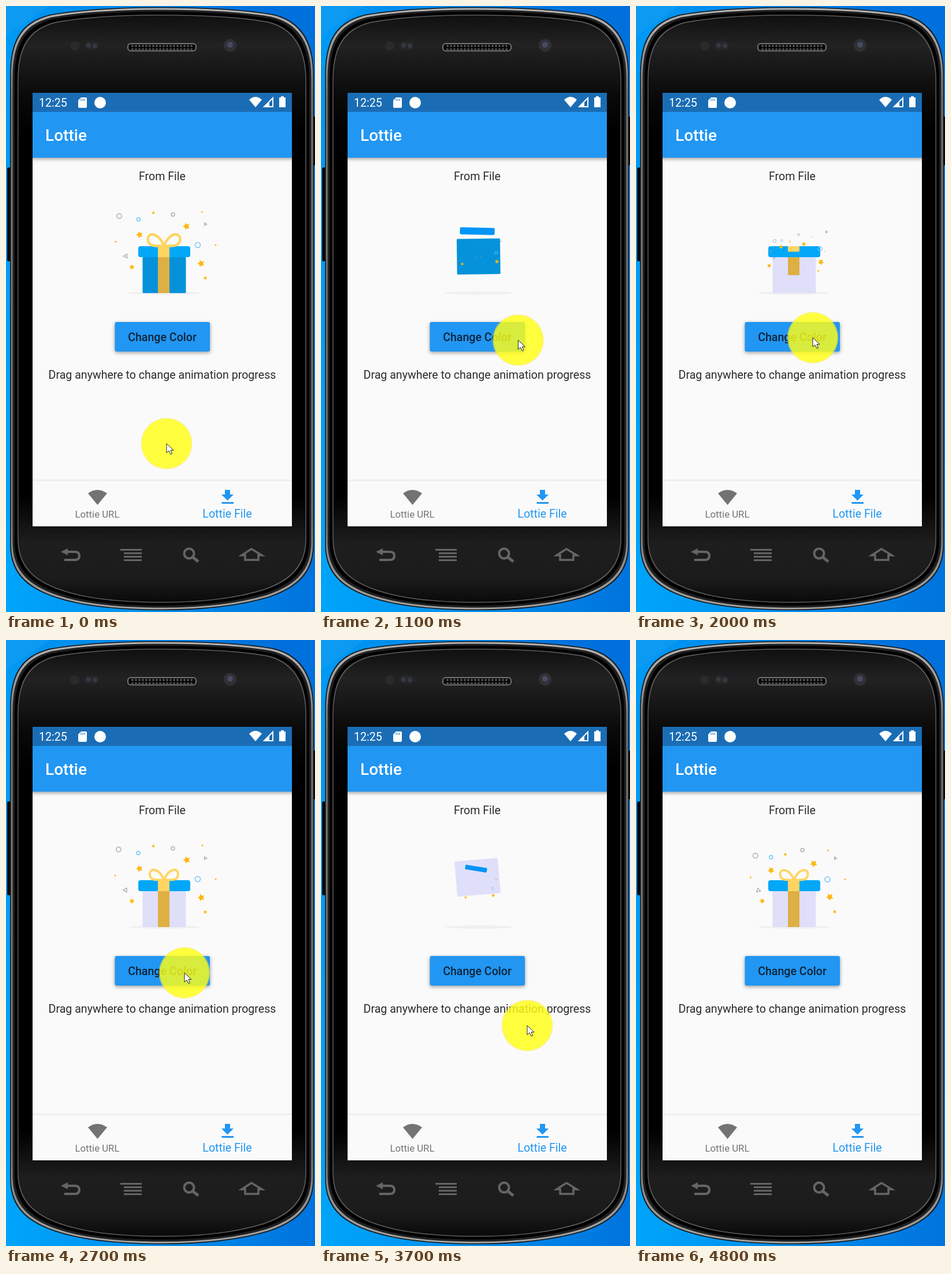
Write an HTML page that moves like this. It is 535 px wide and 1047 px high and loops after 4.9 s.

```html
<!DOCTYPE html>
<html lang="en">
<head>
<meta charset="utf-8">
<title>Lottie</title>
<style>
html, body { margin: 0; width: 100%; height: 100%; overflow: hidden; background: #0078dc; }
svg { display: block; width: 535px; height: 1047px; }
text { font: 19.6px Roboto, sans-serif; fill: #2b2b2b; }
.mid { text-anchor: middle; }
.bold { font-weight: 500; }
.bar { filter: drop-shadow(0 2px 3px #0006); }
.keys { fill: none; stroke: #656565; stroke-width: 4; }
</style>
</head>
<body>
<svg viewBox="0 0 535 1047">
  <defs>
    <linearGradient id="wall" x1="0" y1="1" x2="1" y2="0.75">
      <stop offset="0" stop-color="#00a5fb"/><stop offset="1" stop-color="#0071dc"/>
    </linearGradient>
    <linearGradient id="rim" x1="0" y1="0" x2="0" y2="1">
      <stop offset="0" stop-color="#b5b5b5"/><stop offset=".15" stop-color="#777"/>
      <stop offset=".85" stop-color="#777"/><stop offset="1" stop-color="#a5a5a5"/>
    </linearGradient>
    <linearGradient id="face" x1="0" y1="0" x2="0" y2="1">
      <stop offset="0" stop-color="#101010"/><stop offset=".05" stop-color="#222"/>
      <stop offset=".14" stop-color="#090909"/><stop offset=".2" stop-color="#000"/>
      <stop offset=".82" stop-color="#000"/><stop offset=".9" stop-color="#1e1e1e"/>
      <stop offset=".96" stop-color="#1b1b1b"/><stop offset="1" stop-color="#0a0a0a"/>
    </linearGradient>
    <pattern id="mesh" width="6" height="6" patternUnits="userSpaceOnUse">
      <circle cx="3" cy="3" r="1.9" fill="#555"/>
    </pattern>
    <radialGradient id="spot">
      <stop offset=".94" stop-color="#ffff14" stop-opacity=".82"/>
      <stop offset="1" stop-color="#ffe040" stop-opacity=".4"/>
    </radialGradient>
    <path id="shell" d="M7 120C7 60 25 28 75 15Q150 2 270 2Q390 2 462 14C510 25 533 60 533 120V930C533 980 505 1005 455 1022Q380 1044 270 1044Q150 1044 85 1022C35 1005 7 980 7 930Z"/>
    <clipPath id="screen"><path d="M46 150H495V899H46Z"/></clipPath>
  </defs>

  <rect width="535" height="1047" fill="url(#wall)"/>
  <path d="M0 0H75L0 52Z" fill="#18a0f4" opacity=".5"/>
  <rect x="2" y="279" width="8" height="162" rx="2" fill="#080808"/>
  <rect x="530" y="191" width="8" height="84" rx="2" fill="#080808"/>
  <g id="rims"></g>

  <circle cx="119" cy="69" r="8" fill="#2b2a2b"/>
  <rect x="136" y="61" width="25" height="15" rx="7" fill="#252629"/>
  <circle cx="143" cy="68" r="4" fill="#343840"/><circle cx="154" cy="69" r="4" fill="#343840"/>
  <circle cx="388" cy="68" r="11" fill="#303036"/><circle cx="388" cy="67" r="5" fill="#464b61"/>
  <rect x="211" y="65" width="118" height="12.5" rx="5" fill="#070707" stroke="#757575" stroke-width="2"/>
  <rect x="216" y="67" width="108" height="9" fill="url(#mesh)"/>

  <g class="keys">
    <path d="M104 943H119Q127 943 127 950T119 957H101"/>
    <path d="M95 943L107 937V949Z" fill="#656565" stroke="none"/>
    <path d="M198 939.500H235M204 945.500H235M204 951.500H235M204 957.500H235" stroke-width="3"/>
    <circle cx="317" cy="946" r="8.500"/><path d="M323 952L333 960" stroke-width="5"/>
    <path d="M408 949L425 938L443 949H437V957H414V949Z" stroke-width="3.500"/>
  </g>

  <g clip-path="url(#screen)">
    <rect x="46" y="150" width="449" height="749" fill="#fafafa"/>
    <rect class="bar" x="40" y="183" width="461" height="79" fill="#2196f3"/>
    <rect x="46" y="150" width="449" height="33" fill="#1a6db5"/>
    <rect x="46" y="818" width="449" height="3" fill="#efefef"/>
    <g fill="#fff">
      <path d="M130 158H138Q140 158 140 160V174Q140 176 138 176H127Q125 176 125 174V163Z"/>
      <path d="M130 160V164M133 160V164M136 160V164" stroke="#1a6db5"/>
      <circle cx="163" cy="167" r="10"/>
      <path d="M421 162Q432 152 443 162L432 175Z"/>
      <path d="M447 174H462V159Z" fill="none" stroke="#fff" stroke-width="2"/>
      <path d="M446 175H456V165Z"/>
      <path d="M476 156H481V158H484V175H473V158H476Z"/>
    </g>
    <text x="57" y="174" style="fill:#fff">12:25</text>
    <text class="bold" x="68" y="233" style="fill:#fff;font-size:28px">Lottie</text>
    <text class="mid" x="270.500" y="301">From File</text>
    <g id="gift"></g>
    <rect class="bar" x="188.500" y="546" width="164.500" height="51" rx="3" fill="#2196f3"/>
    <text class="mid bold" x="270.500" y="579" style="fill:#0d2438">Change Color</text>
    <text class="mid" x="270.500" y="644">Drag anywhere to change animation progress</text>
    <path d="M142 842Q158 830 175 842L158.500 862Z" fill="#737373"/>
    <path d="M379 836H388V844H394L383.500 854.500L373 844H379ZM373.500 857H394V860H373.500Z" fill="#2196f3"/>
    <text class="mid" x="158" y="884" style="fill:#757575;font-size:16.8px">Lottie URL</text>
    <text class="mid" x="383" y="884" style="fill:#2196f3">Lottie File</text>
  </g>

  <g id="pointer">
    <circle r="44.500" fill="url(#spot)"/>
    <path d="M0 0V16L4 12.500L7 18.500L9.500 17.500L7 11.500H12Z" fill="#fff" stroke="#222"/>
  </g>
</svg>
<script>
const LOOP = 4900, STEP = 100;
const HALF = 1255, LOW = 1440;   // gift plays forward and back; LOW is a moment at its start
const byId = id => document.getElementById(id);

byId('rims').innerHTML = [
  [0, '#151515'], [1.5, 'url(#rim)'], [4.5, '#202020'], [8, '#000'],
  [13, '#5c5c5c'], [14.5, 'url(#face)']
].map(([d, fill]) => `<use href="#shell" fill="${fill}" transform="translate(270 523)
  scale(${1 - d / 263} ${1 - d / 521}) translate(-270 -523)"/>`).join('');

// Linear keyframes: rows of [time, value, value, ...]
function key(t, rows) {
  if (t <= rows[0][0]) return rows[0].slice(1);
  const i = rows.findIndex(r => r[0] > t);
  if (i < 0) return rows[rows.length - 1].slice(1);
  const a = rows[i - 1], b = rows[i], k = (t - a[0]) / (b[0] - a[0]);
  return a.slice(1).map((v, j) => v + (b[j + 1] - v) * k);
}

const POINTER = [
  [0, 278, 756], [150, 245, 600], [350, 169, 201], [450, 190, 270], [600, 270, 520],
  [700, 288, 583], [900, 310, 582], [1200, 357, 575], [1500, 368, 573], [1700, 306, 573],
  [2500, 306, 573], [2700, 309, 575], [3000, 312, 575], [3600, 320, 584], [3700, 357, 666],
  [3800, 425, 790], [3900, 500, 950], [4000, 610, 1120]
];
// Body: centre, height, angle
const BODY = [
  [0, 274, 496, 0, 0], [60, 274, 492, 17, -2], [150, 267, 424, 61, -12.5],
  [250, 271, 410, 61, -5], [400, 274, 448, 62, 2], [480, 274, 465, 62, 0]
];
// Lid: centre, width, height, angle
const LID = [
  [90, 272, 440, 0, 0, 10], [150, 270, 407, 28, 6, 10], [250, 268.5, 395, 38, 8, 9],
  [400, 272, 385, 75, 15, -4], [520, 274, 424.5, 90, 19, 0]
];
const SHADOW = [[90, 0], [150, 49], [250, 58], [450, 62.5]];
const BOW = [[760, 0], [850, .86], [960, 1], [1070, 1], [1255, .88]];

const GOLD = '#fdb80f', GREY = '#a3b0bb', SKY = '#72c4f5';
// Confetti: kind, colour, size, early start, landing point, drift point
const CONFETTI = [
  ['ring', GREY, 4.2, 0, 219, 384, 195, 362], ['ring', SKY, 3, 0, 239, 383, 229, 368],
  ['star', GOLD, 3, 0, 262, 386, 255, 356], ['ring', GREY, 3, 0, 287, 366, 289, 360],
  ['star', GOLD, 6.5, 0, 302, 393, 313, 380], ['dot', GOLD, 1.5, 0, 325, 372, 340, 355],
  ['tri', GREY, 2.6, 1, 345, 377, 345, 377], ['ring', SKY, 4.5, 1, 331, 414, 332, 413],
  ['dot', GOLD, 1.5, 0, 361, 414, 363, 413], ['star', GOLD, 6.5, 1, 333, 443, 338, 445],
  ['star', GOLD, 3.5, 0, 343, 469, 345, 470], ['star', GOLD, 4.8, 1, 219, 451, 218, 451],
  ['tri', GREY, 4, 0, 217, 433, 207, 432], ['dot', GOLD, 1.5, 0, 208, 413, 189, 407],
  ['star', GOLD, 6, 0, 237, 401, 231, 395]
];

function polygon(n, r, inner) {
  return Array.from({ length: n }, (_, i) => {
    const a = i * 2 * Math.PI / n, d = inner && i % 2 ? r * inner : r;
    return (d * Math.cos(a)).toFixed(2) + ',' + (d * Math.sin(a)).toFixed(2);
  }).join(' ');
}

const shapes = {
  ring: (c, r) => `<circle r="${r}" fill="none" stroke="${c}" stroke-width="1.5"/>`,
  dot: (c, r) => `<circle r="${r}" fill="${c}"/>`,
  star: (c, r) => `<polygon points="${polygon(10, r, .52)}" fill="${c}"/>`,
  tri: (c, r) => `<polygon points="${polygon(3, r)}" fill="none" stroke="${c}" stroke-width="1.4"/>`
};

function confetti(p) {
  const drift = 1 - (1 - Math.max(0, (p - 740) / (HALF - 740))) ** 3;
  return CONFETTI.map(([kind, color, size, early, x1, y1, x2, y2]) => {
    const [fly, grow] = key(p, early
      ? [[80, 0, 0], [150, .3, .35], [250, .42, .5], [740, 1, 1]]
      : [[280, 0, 0], [740, 1, 1]]);
    if (!grow) return '';
    const x = 273 + (x1 - 273) * fly + (x2 - x1) * drift;
    const y = 440 + (y1 - 440) * fly + (y2 - y1) * drift;
    const turn = kind === 'tri' && !early ? 90 + 90 * drift : kind === 'star' ? 12 + 25 * drift : 0;
    return `<g transform="translate(${x} ${y}) rotate(${turn}) scale(${grow})">${shapes[kind](color, size)}</g>`;
  }).join('');
}

function block(x, y, w, h, angle, r, fill) {
  return `<rect x="${-w / 2}" y="${-h / 2}" width="${w}" height="${h}" rx="${r}" fill="${fill}"
    transform="translate(${x} ${y}) rotate(${angle})"/>`;
}

function gift(p, color) {
  const [bx, by, bh, ba] = key(p, BODY);
  const [lx, ly, lw, lh, la] = key(p, LID);
  const [shadow] = key(p, SHADOW), [bow] = key(p, BOW);
  const [ribbon] = key(p, [[480, 0], [640, 1]]);
  const loop = 'M0 0C-6 -16 -16 -22 -23 -20C-31 -17 -29 -2 -18 -1C-10 0 -4 -1 0 0';
  return `<ellipse cx="273.5" cy="496" rx="${shadow}" ry="3" fill="#f0f0f0"/>`
    + block(bx, by, 75, bh, ba, 1.5, color)
    + `<rect x="263" y="434" width="20" height="${62 * ribbon}" fill="#deb044"/>`
    + block(lx, ly, lw, lh, la, lh / 5, p < 400 ? '#0095f6' : '#03a7f8')
    + `<rect x="263" y="415" width="20" height="${19 * ribbon}" fill="#ffd463"/>`
    + (bow ? `<g transform="translate(273.5 415) scale(${bow})" fill="none" stroke="#ffd562"
        stroke-width="4.5"><path d="${loop}"/><path d="${loop}" transform="scale(-1 1)"/></g>` : '')
    + confetti(p);
}

function draw(now) {
  const t = Math.floor(now % LOOP / STEP) * STEP;
  const phase = (t - LOW + 2 * HALF) % (2 * HALF);
  const p = HALF - Math.abs(HALF - phase);
  byId('gift').innerHTML = gift(p, t < 1700 ? '#0592da' : '#e0dffa');
  byId('pointer').setAttribute('transform', `translate(${key(t, POINTER)})`);
}

let start;
function tick(now) {
  start ??= now;
  draw(now - start);
  requestAnimationFrame(tick);
}
draw(0);
requestAnimationFrame(tick);
</script>
</body>
</html>
```
